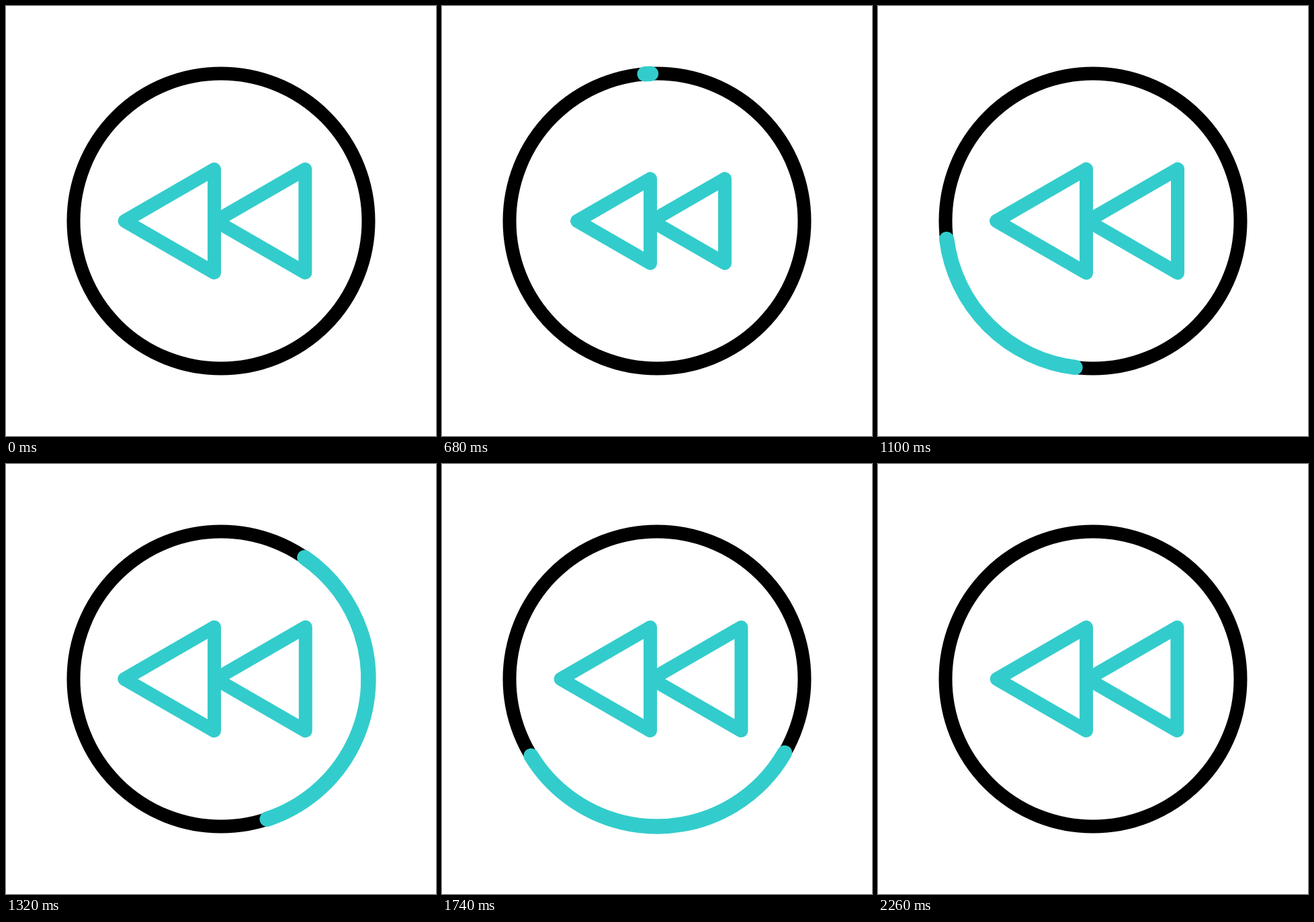
An HTML page with a canvas that plays this animation: 640 px wide and 640 px high, repeating every 2720 ms.

```html
<!DOCTYPE html>
<html lang="en">
<head>
<meta charset="utf-8">
<title>Rewind</title>
<style>
  html, body { margin: 0; width: 100%; height: 100%; overflow: hidden; background: #fff; }
  canvas { display: block; width: 100vmin; height: 100vmin; }
</style>
</head>
<body>
<canvas id="stage" width="640" height="640"></canvas>
<script>
const ctx = document.getElementById('stage').getContext('2d');
const LOOP = 2720, STEP = 20;
const CENTER = 320, RADIUS = 219.5;
const TEAL = '#33cccc';
const SWEEP_START = 600, SWEEP_END = 2250;

// [time in ms, value]
const SCALE = [[0, 1], [280, 1.016], [680, 0.817], [1100, 1.005], [1540, 1.001], [1940, 1], [2260, 1]];
const HEAD = [[SWEEP_START, 0], [680, 0.0478], [1100, 0.319], [1540, 0.6145], [1940, 0.856], [SWEEP_END, 1]];
const TAIL = [[SWEEP_START, 0], [680, 0.0334], [1100, 0.2305], [1540, 0.4735], [1940, 0.7666], [SWEEP_END, 1]];

// Smooth monotone interpolation between keys
function curve(keys, t) {
  const last = keys.length - 1;
  if (t <= keys[0][0]) return keys[0][1];
  if (t >= keys[last][0]) return keys[last][1];
  const secant = i => (keys[i + 1][1] - keys[i][1]) / (keys[i + 1][0] - keys[i][0]);
  const slope = i => {
    if (i === 0) return secant(0);
    if (i === last) return secant(last - 1);
    const a = secant(i - 1), b = secant(i);
    return a * b > 0 ? 2 * a * b / (a + b) : 0;
  };
  let i = 0;
  while (t >= keys[i + 1][0]) i++;
  const [t0, v0] = keys[i], [t1, v1] = keys[i + 1];
  const span = t1 - t0, u = (t - t0) / span;
  const ease = smooth(u);
  return v0 + (v1 - v0) * ease
    + span * u * (1 - u) * ((1 - u) * slope(i) - u * slope(i + 1));
}

function smooth(u) {
  return u * u * (3 - 2 * u);
}

function strokeWith(color, width) {
  ctx.strokeStyle = color;
  ctx.lineWidth = width;
  ctx.stroke();
}

function triangle(tipX, backX, half) {
  ctx.beginPath();
  ctx.moveTo(tipX, CENTER);
  ctx.lineTo(backX, CENTER - half);
  ctx.lineTo(backX, CENTER + half);
  ctx.closePath();
  strokeWith(TEAL, 20);
}

// Two counter-clockwise turns from the top
function sweepAngle(keys, t) {
  return -Math.PI / 2 - 4 * Math.PI * smooth(curve(keys, t));
}

function draw(t) {
  ctx.fillStyle = '#fff';
  ctx.fillRect(0, 0, 640, 640);
  ctx.lineCap = ctx.lineJoin = 'round';

  ctx.beginPath();
  ctx.arc(CENTER, CENTER, RADIUS, 0, 2 * Math.PI);
  strokeWith('#000', 20);

  if (t > SWEEP_START && t < SWEEP_END) {
    ctx.beginPath();
    ctx.arc(CENTER, CENTER, RADIUS, sweepAngle(TAIL, t), sweepAngle(HEAD, t), true);
    strokeWith(TEAL, 22.4);
  }

  const half = 77 * curve(SCALE, t), width = half * Math.sqrt(3);
  triangle(310 - width, 310, half);
  triangle(312, 312 + width, half);
}

const start = performance.now();
function tick() {
  const t = (performance.now() - start) % LOOP;
  draw(Math.floor(t / STEP) * STEP);
  requestAnimationFrame(tick);
}
tick();
</script>
</body>
</html>
```
